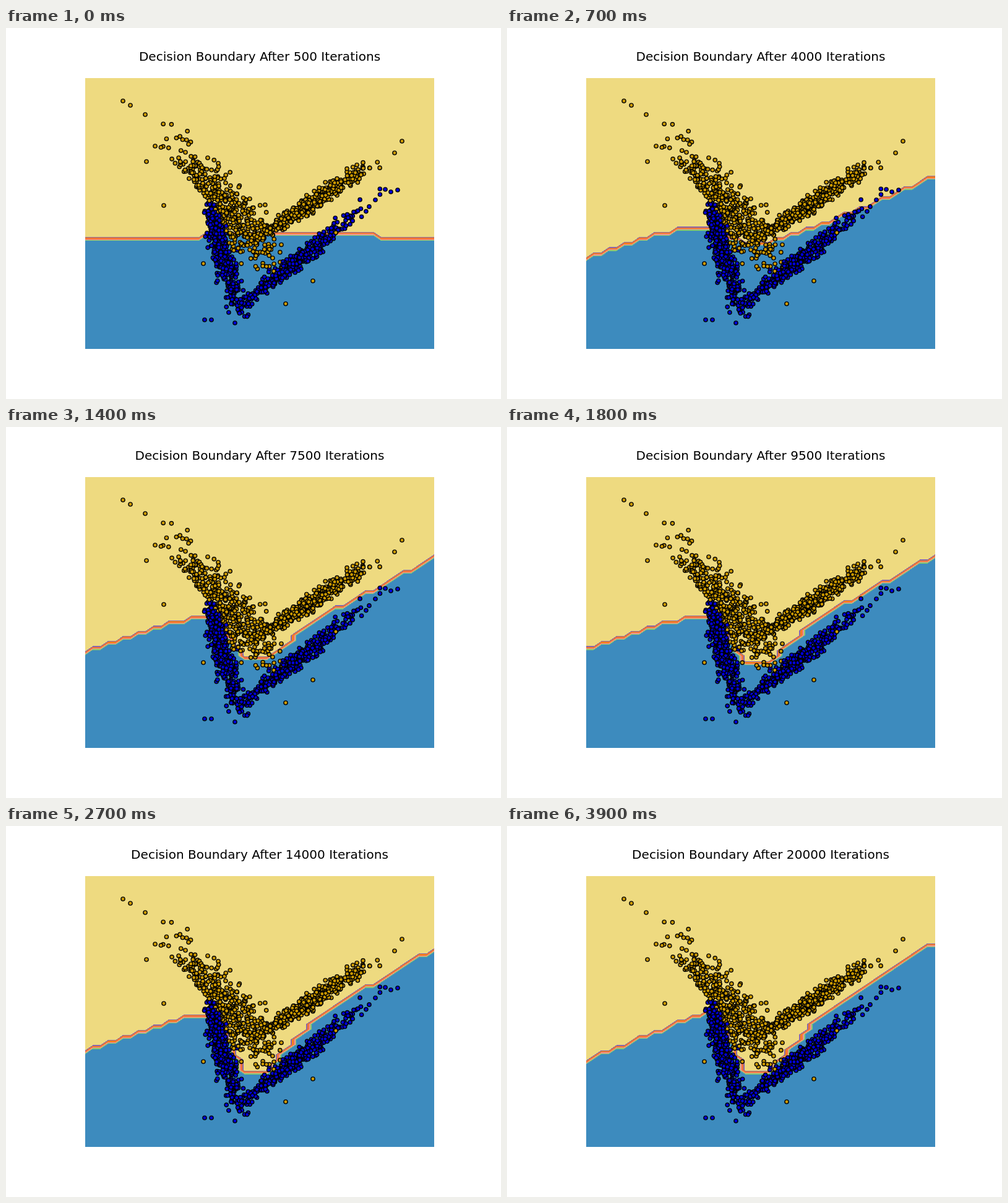
An HTML page with a canvas for the animation above (4000 ms loop, 800 by 600 pixels).

```html
<!DOCTYPE html>
<html lang="en">
<head>
<meta charset="utf-8">
<title>Decision Boundary</title>
<style>
  html, body { margin: 0; width: 100%; height: 100%; overflow: hidden; background: #fff; }
  svg, canvas { position: absolute; left: 0; top: 0; display: block; }
  text { font: 20px "DejaVu Sans", sans-serif; letter-spacing: 0.05px; text-anchor: middle; }
</style>
</head>
<body>
<svg width="800" height="600" viewBox="0 0 800 600">
  <rect x="128" y="81" width="564" height="438" fill="#3d8bbe" shape-rendering="crispEdges"/>
  <g id="bands" shape-rendering="crispEdges"></g>
  <text id="title" x="410" y="53"></text>
</svg>
<canvas id="dots" width="800" height="600"></canvas>
<script>
const STEP_MS = 100, STEPS = 40;
const LEFT = 128.18, TOP = 81.82, COLS = 46, ROWS = 53;
const CELL_W = 563.64 / COLS, CELL_H = 436.36 / ROWS;

// Fills from the blue class up to the yellow one, one per contour level
const FILLS = ['#88ca6b', '#ec9a91', '#f17047', '#fb8310', '#8a64ae', '#eeda80'];
const levelOf = i => 0.15 * (i + 1);

// The boundary falls to a knee, runs level, drops into a notch and climbs in two slopes.
// Rows are counted from the top; only the knee is a column.
const poses = [
  { step: 0,  left: 31.4, knee: 16, shoulder: 30.45, floor: 30, bend: 30,   right: 30.95 },
  { step: 4,  left: 34.6, knee: 11, shoulder: 30.5,  floor: 31, bend: 29.1, right: 22.6 },
  { step: 10, left: 34.5, knee: 12, shoulder: 28.1,  floor: 33, bend: 27.5, right: 15 },
  { step: 14, left: 33.6, knee: 14, shoulder: 27.1,  floor: 35, bend: 27,   right: 15.3 },
  { step: 21, left: 33.1, knee: 12, shoulder: 27.1,  floor: 37, bend: 26.5, right: 14.6 },
  { step: 33, left: 34.6, knee: 16, shoulder: 26.1,  floor: 38, bend: 26.6, right: 12.8 },
  { step: 39, left: 35.5, knee: 16, shoulder: 26.1,  floor: 38, bend: 26.8, right: 12.5 }
];

const mix = (a, b, t) => a + (b - a) * t;

function poseAt(step) {
  const i = Math.max(1, poses.findIndex(p => p.step >= step));
  const a = poses[i - 1], b = poses[i], pose = {};
  for (const key in a) pose[key] = mix(a[key], b[key], (step - a.step) / (b.step - a.step));
  return pose;
}

function rowsAt(step) {
  const p = poseAt(step);
  const knots = [[0, p.left], [p.knee, p.shoulder], [17, p.shoulder], [21, p.floor],
    [24, p.floor], [31, p.bend], [COLS, p.right]];
  return Array.from({ length: COLS + 1 }, (_, col) => {
    const i = Math.max(1, knots.findIndex(k => k[0] >= col));
    const [x0, y0] = knots[i - 1], [x1, y1] = knots[i];
    return Math.round(mix(y0, y1, (col - x0) / (x1 - x0)));
  });
}

// Marching-squares contour of the two-class grid, closed along the top edge
function contour(rows, level) {
  const pts = [[0, -0.1]];
  rows.forEach((row, c) => {
    pts.push([c, row + 1 - level]);
    const next = rows[c + 1];
    for (let r = row + 1; r <= next; r++) pts.push([c + level, r]);
    for (let r = row; r > next; r--) pts.push([c + 1 - level, r]);
  });
  pts.push([COLS, -0.1]);
  return 'M' + pts.map(([c, r]) =>
    (LEFT + c * CELL_W).toFixed(2) + ' ' + (TOP + r * CELL_H).toFixed(2)).join('L') + 'Z';
}

const bands = document.getElementById('bands');
const title = document.getElementById('title');
const paths = FILLS.map(fill => {
  const path = document.createElementNS('http://www.w3.org/2000/svg', 'path');
  path.setAttribute('fill', fill);
  return bands.appendChild(path);
});

function show(step) {
  const rows = rowsAt(step);
  paths.forEach((path, i) => path.setAttribute('d', contour(rows, levelOf(i))));
  title.textContent = `Decision Boundary After ${(step + 1) * 500} Iterations`;
}

// Scatter: four elongated Gaussian clusters, u along and v across
const GOLD = '#cc9900', BLUE = '#0000d8';
let seed = 20;
function random() {
  seed = (seed + 0x6D2B79F5) | 0;
  let t = Math.imul(seed ^ (seed >>> 15), 1 | seed);
  t = (t + Math.imul(t ^ (t >>> 7), 61 | t)) ^ t;
  return ((t ^ (t >>> 14)) >>> 0) / 4294967296;
}
const gauss = () => Math.sqrt(-2 * Math.log(1 - random())) * Math.cos(2 * Math.PI * random());

const clusters = [
  { color: GOLD,
    at: (u, v) => [354 + 47 * u, 291 + 45 * u + 26 * v],
    ok: (x, y) => x > 250 && x < 458 && y > 150 && y < 402 &&
      x > 333 + (y - 285) * (y < 285 ? 0.9 : 0.35) && (x < 385 || y > 270) },
  { color: BLUE,
    at: (u, v) => [349 + 12 * u + (7.5 + u) * v, 363 + 45 * u],
    ok: (x, y) => y > 282 && y < 472 && x > 319 },
  { color: GOLD,
    at: (u, v) => [488 + 48 * u, 287 - 31 * u + 7 * v],
    ok: x => x > 395 && x < 605 },
  { color: BLUE,
    at: (u, v) => [466 + 48 * u, 380 - 38 * u + 7.5 * v],
    ok: x => x > 376 && x < 605 }
];

// Far outliers
const goldStrays = [[189, 118], [201, 125], [225, 140], [241, 191], [227, 216], [255, 287],
  [319, 381], [452, 446], [496, 409], [533, 331], [628, 202], [640, 183]];
const blueStrays = [[321, 472], [332, 472], [370, 477], [613, 261], [622, 265], [633, 262]];

const ctx = document.getElementById('dots').getContext('2d');
ctx.lineWidth = 1.39;
ctx.strokeStyle = '#000';

function dot([x, y], color) {
  ctx.beginPath();
  ctx.arc(x, y, 3.1, 0, 2 * Math.PI);
  ctx.fillStyle = color;
  ctx.fill();
  ctx.stroke();
}

function sample({ at, ok }) {
  let p;
  do p = at(gauss(), gauss()); while (!ok(...p));
  return p;
}

for (let i = 0; i < 440; i++) {
  for (const cluster of clusters) dot(sample(cluster), cluster.color);
}
goldStrays.forEach(p => dot(p, GOLD));
blueStrays.forEach(p => dot(p, BLUE));

const start = performance.now();
let shown = -1;
function tick() {
  const step = Math.floor((performance.now() - start) / STEP_MS) % STEPS;
  if (step !== shown) show(shown = step);
  requestAnimationFrame(tick);
}
tick();
</script>
</body>
</html>
```
